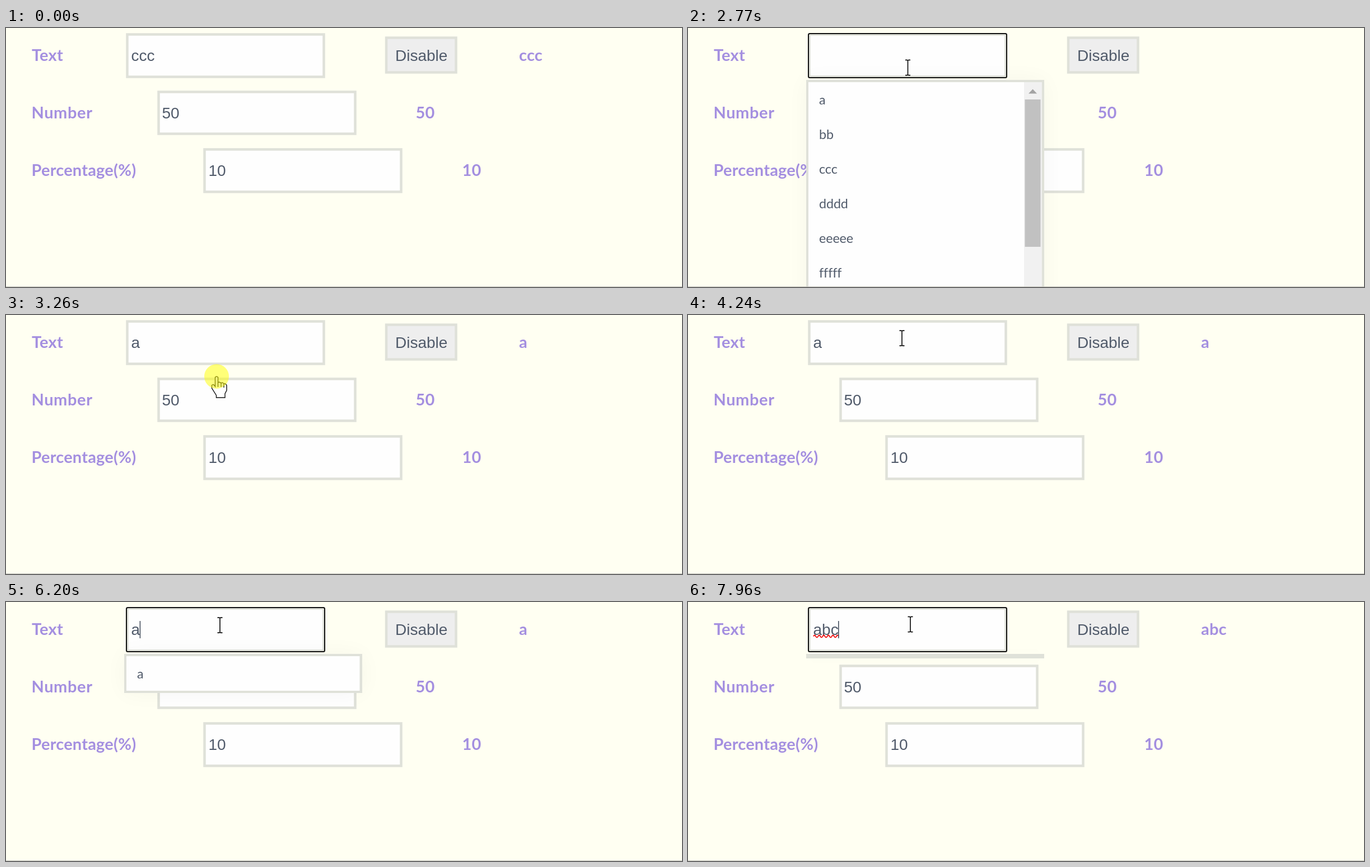
An HTML page that plays this animation: 1207 px wide and 464 px high, repeating every 8000 ms.

```html
<!DOCTYPE html>
<html lang="en">
<head>
<meta charset="utf-8">
<title>Form fields</title>
<style>
  html, body { margin: 0; width: 100%; height: 100%; overflow: hidden; background: #fffff2; }
  svg { display: block; width: 100%; height: 100%; }
  text { white-space: pre; }
  .label { font: 700 29px Lato, sans-serif; fill: #a48fe0; letter-spacing: .2px; }
  .field { font: 28px "Liberation Sans", Arial, sans-serif; fill: #515b6b; }
  .item { font: 23.3px Lato, sans-serif; fill: #515b6b; letter-spacing: -.1px; }
  .box { fill: #fefefe; stroke: #dfe1d9; stroke-width: 4.5; }
  .ink { fill: none; stroke: #111; stroke-width: 1.7; }
</style>
</head>
<body>
<svg id="stage" viewBox="0 0 1207 464" preserveAspectRatio="none">
  <defs>
    <filter id="soft" x="-50%" y="-100%" width="200%" height="300%"><feGaussianBlur stdDeviation="20"/></filter>
  </defs>
  <rect width="1207" height="464" fill="#fffff2"/>

  <text class="label" x="46" y="59">Text</text>
  <text class="label" x="45.5" y="162" style="letter-spacing:.6px">Number</text>
  <text class="label" x="45.5" y="265">Percentage(%)</text>
  <text class="label" x="731.5" y="162">50</text>
  <text class="label" x="814.5" y="265">10</text>
  <text class="label" id="echo" x="916" y="59"></text>

  <rect class="box" x="216.5" y="11.5" width="351" height="76"/>
  <rect class="box" x="272.5" y="114.5" width="351" height="75"/>
  <rect class="box" x="354.5" y="217.5" width="351" height="76"/>
  <rect class="box" x="679" y="17.5" width="124.5" height="62" style="fill:#eee"/>
  <text class="field" x="695" y="58.5">Disable</text>
  <text class="field" x="278.5" y="161.5">50</text>
  <text class="field" x="361.5" y="264.5">10</text>
  <text class="field" id="value" x="223.5" y="58.5"></text>

  <rect id="focus" x="215" y="10" width="354" height="79" rx="2.5" fill="none" stroke="#111" stroke-width="2"/>
  <path id="squiggle" fill="none" stroke="#f01414" stroke-width="1.8"/>
  <rect id="caret" y="34" width="1.6" height="31" fill="#46505f"/>

  <g id="menu">
    <rect id="shade" x="211" y="93" width="425" fill="#000" opacity=".035" filter="url(#soft)"/>
    <rect id="frame" x="211" y="93" width="425" fill="#dfe1d9"/>
    <rect id="panel" x="215" y="97" width="416.5" fill="#fefefe"/>
    <g id="items"></g>
    <g id="bar">
      <rect x="600" y="97" width="31.5" height="367" fill="#f1f1f1"/>
      <rect x="601.5" y="128" width="28" height="264" fill="#c1c1c1"/>
      <path d="M608 117.5L615.5 109.5L623 117.5Z" fill="#a3a3a3"/>
    </g>
  </g>

  <rect y="463" width="1207" height="1" fill="#c4c4bc"/>

  <g id="pointer">
    <path id="beam" class="ink" d="M-4.5-13.7H-1.5L0-12.7L1.5-13.7H4.5M0-12.7V12.7M-4.5 13.7H-1.5L0 12.7L1.5 13.7H4.5"/>
    <path id="arrow" d="M0 0V24L5.5 19L9.5 27.5L13 26L9.2 17.7H17Z" fill="#fff" stroke="#111" stroke-width="1.4"/>
    <path id="hand" d="M-2.5 1.5Q0-1 2.5 1.5V11Q5 9 8 12Q11 10 13 13.5Q16 12 18 16V25L15 31V38H-.5V34L-8.5 21V16Q-6 12.5-2.5 18ZM2.5 11V19M8 12V19M13 13.5V20" fill="#fff" stroke="#111" stroke-width="1.4"/>
    <circle id="click" r="22" fill="#ff0" opacity=".5"/>
  </g>
</svg>
<script>
const LOOP = 8000;
const ALL = ['a', 'bb', 'ccc', 'dddd', 'eeeee', 'fffff'];
const $ = id => document.getElementById(id);

// time, typed text, menu rows (null = closed)
const form = [
  [0, 'ccc', null],
  [2130, '', ALL],
  [3260, 'a', null],
  [4970, '', ALL],
  [5970, 'a', ['a']],
  [6470, 'ab', []],
  [6830, 'abc', []]
];

// time, x, y, shape
const moves = [
  [0, 0, 0, ''],
  [760, 1019, 431, 'arrow'],
  [870, 815, 283, 'arrow'],
  [990, 580, 149, 'beam'],
  [1130, 497, 122, 'beam'],
  [1260, 457.5, 73.5, 'beam'],
  [1400, 435, 61, 'beam'],
  [1510, 420, 52, 'beam'],
  [1630, 414.5, 49, 'beam'],
  [2770, 392.5, 71, 'beam'],
  [2870, 381, 101, 'hand'],
  [3000, 376, 110, 'hand'],
  [3490, 391, 24.5, 'beam'],
  [3620, 391, 20.5, 'beam'],
  [3850, 389, 25, 'beam'],
  [3980, 386, 33, 'beam'],
  [4110, 383.5, 39, 'beam'],
  [4240, 382, 41.5, 'beam'],
  [7330, 389, 41, 'beam'],
  [7460, 397, 40, 'beam']
];

const clicks = [[2130, 2270], [3260, 3360], [4970, 5100]];
const caretOn = [[2130, 2630], [3130, 3260], [4970, 5600], [5970, 7330], [7830, LOOP]];
const caretX = [224, 238.6, 254.2, 268];

const at = (table, t) => table.filter(row => row[0] <= t).pop();
const within = (spans, t) => spans.some(([a, b]) => t >= a && t < b);
const show = (id, on) => { $(id).style.display = on ? '' : 'none'; };

let wave = 'M224 61.5';
for (let i = 0; i < 11; i++) wave += `q2.05 ${i % 2 ? 4 : -4} 4.1 0`;
$('squiggle').setAttribute('d', wave);

ALL.forEach((word, i) => {
  const row = document.createElementNS('http://www.w3.org/2000/svg', 'text');
  row.setAttribute('class', 'item');
  row.setAttribute('x', 234);
  row.setAttribute('y', 136.5 + 62 * i);
  row.textContent = word;
  $('items').append(row);
});

function drawMenu(rows) {
  show('menu', rows);
  if (!rows) return;
  const full = rows.length > 1;
  const inner = full ? 420 : rows.length * 62;
  $('frame').setAttribute('height', inner + 8);
  $('shade').setAttribute('height', inner + 8);
  $('panel').setAttribute('height', inner);
  show('bar', full);
  [...$('items').children].forEach(row => {
    row.style.display = rows.includes(row.textContent) ? '' : 'none';
  });
}

function draw(t) {
  const [, typed, rows] = at(form, t);
  const [, x, y, shape] = at(moves, t);
  $('value').textContent = typed;
  $('echo').textContent = typed;
  drawMenu(rows);
  show('focus', rows);
  show('caret', within(caretOn, t));
  $('caret').setAttribute('x', caretX[Math.min(typed.length, 3)]);
  show('squiggle', t >= 7960);
  for (const id of ['beam', 'arrow', 'hand']) show(id, id === shape);
  show('click', within(clicks, t));
  $('pointer').setAttribute('transform', `translate(${x} ${y})`);
}

const start = performance.now();
function tick() {
  draw((performance.now() - start) % LOOP);
  requestAnimationFrame(tick);
}
tick();
</script>
</body>
</html>
```
